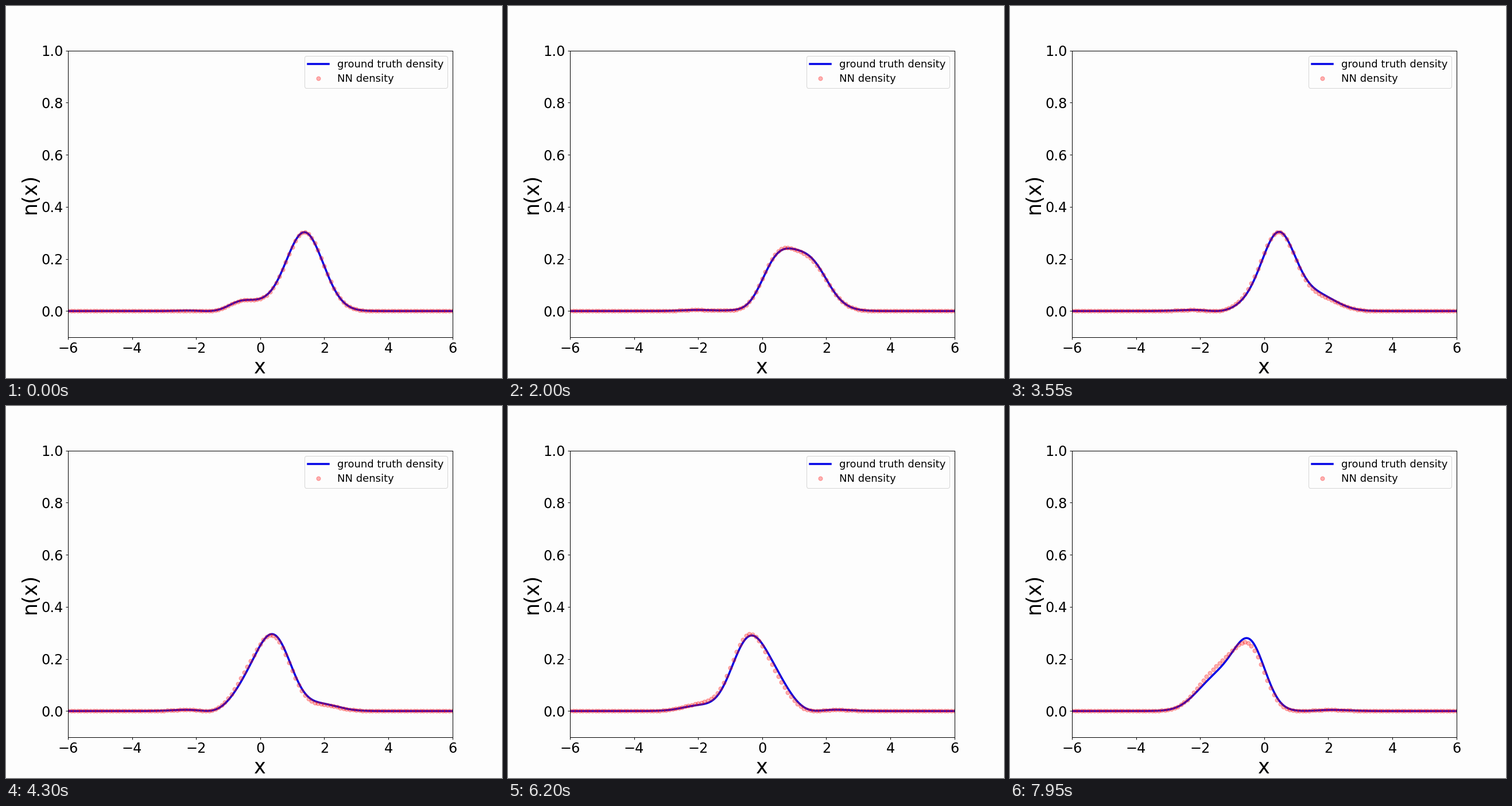
Recreate the animation shown at these times as a matplotlib script. Size 864 by 648 pixels, loop 8 s.

```python
import numpy as np
import matplotlib.pyplot as plt
from matplotlib.animation import FuncAnimation

FRAMES, STEP = 160, 50
PERIOD = 21.4    # seconds for one swing of the harmonic trap
DRIFT = 1.036    # the network's density runs slightly ahead in time
PAPER = "#fdfdfd"

# starting wave function: (amplitude, centre, width) of its Gaussian parts
PACKETS = [(0.55, 1.38, 0.585), (0.17, -0.65, 0.38), (-0.045, -2.2, 0.39)]


def density(x, t):
    """Density at t seconds of the packets swinging in a harmonic trap."""
    angle = 2 * np.pi * t / PERIOD
    cos, sin = np.cos(angle), np.sin(angle)
    psi = 0
    for amp, centre, width in PACKETS:
        a = 1 / (2 * width ** 2)
        b = a * centre
        z = cos + 1j * a * sin
        psi = psi + amp / np.sqrt(z) * np.exp(
            -(a * cos + 1j * sin) / z * x ** 2 / 2
            + b * x / z
            + 1j * b ** 2 * sin / (2 * z) - b * centre / 2)
    return np.abs(psi) ** 2


x_line = np.linspace(-6, 6, 481)
x_dots = np.linspace(-6, 6, 121)

fig, ax = plt.subplots(figsize=(12, 9), dpi=72, facecolor=PAPER)
fig.subplots_adjust(left=0.125, right=0.9, bottom=0.11, top=0.88)
ax.set_facecolor(PAPER)
line, = ax.plot(x_line, density(x_line, 0), color="#0000e6", lw=3.5,
                label="ground truth density")
dots, = ax.plot(x_dots, density(x_dots, 0), "ro", ms=6.9, mew=1.2, alpha=0.3,
                label="NN density")
ax.set_xlim(-6, 6)
ax.set_ylim(-0.1, 1)
ax.set_yticks(np.arange(0, 1.1, 0.2))
ax.tick_params(labelsize=24, length=4, pad=4, width=1)
ax.spines[:].set_linewidth(1)
ax.set_xlabel("x", fontsize=35)
ax.set_ylabel("n(x)", fontsize=35, labelpad=3)
ax.legend(loc="upper right", fontsize=18, facecolor=PAPER,
          labelspacing=0.39, borderpad=0.37)


def update(frame):
    t = frame * STEP / 1000
    line.set_ydata(density(x_line, t))
    dots.set_ydata(density(x_dots, t * DRIFT))
    return line, dots


anim = FuncAnimation(fig, update, frames=FRAMES, interval=STEP,
                     repeat=True, repeat_delay=0)
plt.show()
```
